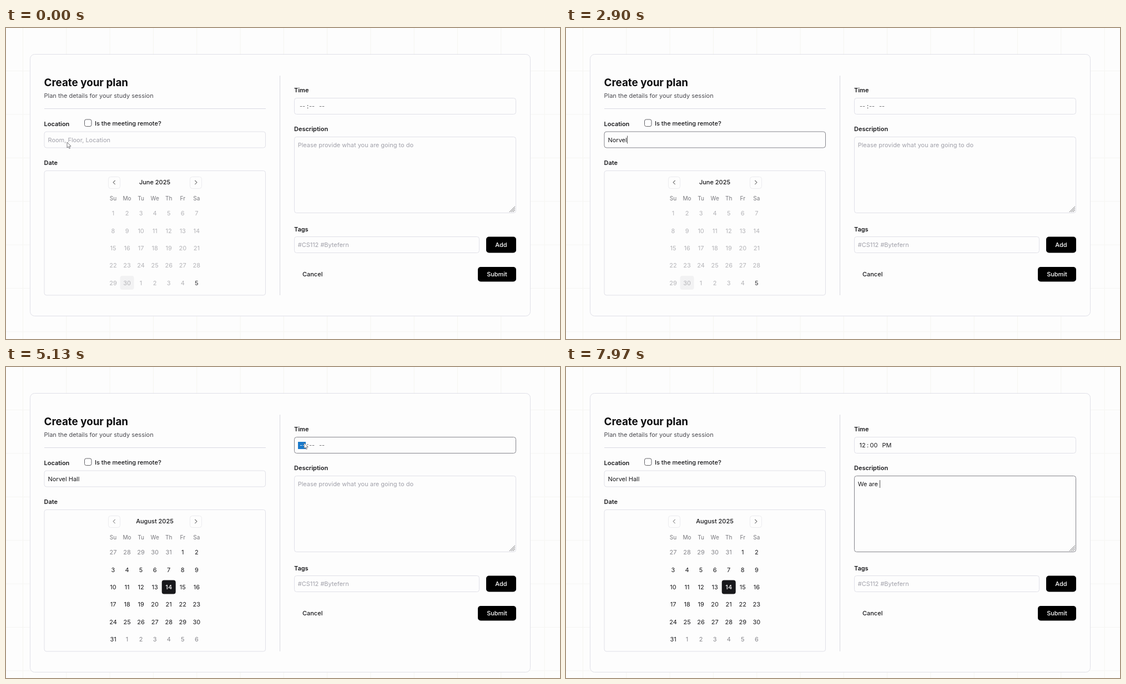
These frames come from a looping animation (998 px wide and 561 px high, 8000 ms). An HTML page with a canvas:

```html
<!DOCTYPE html>
<html lang="en">
<head>
<meta charset="utf-8">
<title>Plan form</title>
<style>
  html, body { margin: 0; width: 100%; height: 100%; overflow: hidden; background: #fdfdfd; }
  canvas { display: block; width: 998px; height: 561px; }
</style>
</head>
<body>
<canvas id="stage" width="998" height="561"></canvas>
<script>
const ctx = document.getElementById('stage').getContext('2d');
const LOOP = 8000;
const INK = '#18181b', MUTED = '#a1a1aa', LINE = '#e0e0e8', FOCUS = '#85858c', BLUE = '#1979ca';
const COL = 25.05, ROW = 31.3;

// Moments at which the form changes
const at = {
  focusPlace: 900, blurPlace: 3800, july: 3800, august: 4100, pickDay: 4700,
  focusTime: 5080, hourOne: 5300, hourTwo: 5480, minutes: 5650, half: 5830, focusNote: 6300
};
const placeKeys = [1670, 2170, 2270, 2400, 2530, 2730, 3130, 3230, 3320, 3400, 3480];
const noteKeys = [7030, 7200, 7330, 7400, 7470, 7630, 7830];

// Pointer stops: time, x, y, shape
const stops = [
  [0, 110, 206, 'arrow'], [60, 114, 206, 'beam'], [830, 151, 195, 'beam'], [1670, 151, 195, 'none'],
  [3540, 151, 195, 'beam'], [3600, 190, 225, 'arrow'], [3740, 339, 282, 'hand'],
  [4300, 339, 282, 'hand'], [4550, 292, 393, 'hand'], [4800, 292, 393, 'hand'],
  [4880, 370, 320, 'arrow'], [5060, 537, 137, 'arrow'], [6060, 537, 137, 'arrow'],
  [6130, 550, 160, 'arrow'], [6170, 580, 200, 'beam'], [6220, 593, 212, 'beam'], [7030, 593, 212, 'none']
];

function text(str, x, y, { size = 10.98, weight = 400, color = INK, align = 'left' } = {}) {
  ctx.font = `${weight} ${size}px Inter, sans-serif`;
  ctx.fillStyle = color;
  ctx.textAlign = align;
  ctx.fillText(str, x, y);
}

function box(x, y, w, h, r, { fill, stroke } = {}) {
  ctx.beginPath();
  ctx.roundRect(x, y, w, h, r);
  if (fill) { ctx.fillStyle = fill; ctx.fill(); }
  if (stroke) { ctx.strokeStyle = stroke; ctx.lineWidth = 1; ctx.stroke(); }
}

function path(points, color, width = 1, fill) {
  ctx.beginPath();
  points.forEach(([x, y]) => ctx.lineTo(x, y));
  if (fill) { ctx.closePath(); ctx.fillStyle = fill; ctx.fill(); }
  ctx.strokeStyle = color;
  ctx.lineWidth = width;
  ctx.stroke();
}

const field = (x, y, w, h, focused) => box(x, y, w, h, 4, { stroke: focused ? FOCUS : LINE });
const label = (str, x, y) => text(str, x, y, { weight: 600 });

function button(str, x, y, w, h) {
  box(x, y, w, h, 5, { fill: '#000' });
  text(str, x + w / 2, y + h / 2 + 4, { weight: 500, color: '#fff', align: 'center' });
}

function drawGrid() {
  for (let x = 30.5; x < 998; x += 78.3) path([[x, 0], [x, 561]], '#f5f5f0');
  for (let y = 77.5; y < 561; y += 78.4) path([[0, y], [998, y]], '#f5f5f3');
}

// Typed text with its blinking caret
function typed(str, keys, hint, x, y, t, focusedFrom, focusedTo) {
  const count = keys.filter(k => t >= k).length;
  const shown = str.slice(0, count);
  text(shown || hint, x, y, { color: count ? INK : MUTED });
  if (t < focusedFrom || t >= focusedTo) return;
  const last = count ? keys[count - 1] : focusedFrom;
  if ((t - last) % 1060 < 530) {
    ctx.fillStyle = '#555';
    ctx.fillRect(Math.round(x + ctx.measureText(shown).width), y - 11, 1, 14);
  }
}

function navButton(x, dir, hover, dim) {
  box(x, 268.5, 21, 21, 4, { fill: hover ? '#eeeef0' : null, stroke: '#ececef' });
  const cx = x + 10.5;
  path([[cx - 1.7 * dir, 275], [cx + 1.9 * dir, 278.6], [cx - 1.7 * dir, 282.2]],
    hover ? '#222' : dim ? '#999' : '#777', 1.1);
}

function drawCalendar(t, pointer) {
  const month = t < at.july ? 5 : t < at.august ? 6 : 7;
  const center = { align: 'center' };
  text(['June', 'July', 'August'][month - 5] + ' 2025', 268, 282, { ...center, weight: 500 });
  const hover = pointer.shape === 'hand' && pointer.y < 292;
  navButton(184.5, -1, false, month > 5);
  navButton(331.5, 1, hover);
  'Su Mo Tu We Th Fr Sa'.split(' ').forEach((d, i) =>
    text(d, 193 + i * COL, 311, { ...center, size: 10.03, color: '#77777c' }));

  const lead = new Date(2025, month, 1).getDay();
  const cells = month === 7 ? 42 : 35;
  for (let i = 0; i < cells; i++) {
    const date = new Date(2025, month, 1 - lead + i);
    const x = 193 + (i % 7) * COL;
    const y = 334.3 + Math.floor(i / 7) * ROW;
    const day = date.getDate();
    const outside = date.getMonth() !== month;
    const disabled = date < new Date(2025, 6, 5);
    const today = date.getMonth() === 5 && day === 30;
    const target = month === 7 && !outside && day === 14;
    const picked = target && t >= at.pickDay;
    const hovered = target && pointer.shape === 'hand' && Math.abs(pointer.y - y) < 13;
    if (picked || today || hovered)
      box(x - 12.5, y - 12.5, 25, 25, 4, { fill: picked ? INK : '#f2f2f3' });
    let color = outside ? '#85858a' : INK;
    if (disabled) color = '#b4b4b8';
    else if (month === 5) color = '#4a4a4e';
    if (picked) color = '#fff';
    const strong = picked || (month === 5 && !disabled);
    text(day, x, y + 4, { ...center, color, weight: strong ? 500 : 400 });
  }
}

function drawTime(t) {
  const focused = t >= at.focusTime && t < at.focusNote;
  field(519.5, 126.5, 399, 29, focused);
  const hour = t < at.hourOne ? '--' : t < at.hourTwo ? '01' : '12';
  const minute = t < at.minutes ? '--' : '00';
  const half = t < at.half ? '--' : 'PM';
  const selected = focused ? (t < at.hourTwo ? 0 : 1) : -1;
  [[hour, 534, 14], [minute, 554.5, 18]].forEach(([str, x, w], i) => {
    const on = i === selected;
    const blank = str === '--';
    if (blank && i) x = 551;
    if (on) { ctx.fillStyle = BLUE; ctx.fillRect(x - w / 2 - 1, 135, w, 13); }
    text(str, x, 145, { align: 'center', color: on ? '#fff' : blank ? '#66666a' : INK });
  });
  text(':', 543.5, 145, { align: 'center' });
  text(half, half === '--' ? 564 : 569.5, 145, { color: half === '--' ? '#66666a' : INK });
}

function pointerAt(t) {
  let i = stops.length - 1;
  while (stops[i][0] > t) i--;
  const a = stops[i], b = stops[i + 1] || a;
  const p = b === a ? 0 : (t - a[0]) / (b[0] - a[0]);
  const ease = p * p * (3 - 2 * p);
  return { x: a[1] + (b[1] - a[1]) * ease, y: a[2] + (b[2] - a[2]) * ease, shape: a[3] };
}

function drawPointer({ x, y, shape }) {
  if (shape === 'none') return;
  ctx.save();
  ctx.translate(x, y);
  ctx.lineJoin = 'round';
  if (shape === 'arrow') {
    path([[0, 0], [0, 10], [2.3, 8], [3.9, 11.4], [5.5, 10.7], [4, 7.4], [7, 7.2]], '#66666a', 0.9, '#fff');
  } else if (shape === 'beam') {
    path([[-2, -6], [0, -5.3], [2, -6]], '#77777c');
    path([[0, -5.3], [0, 5.3]], '#77777c');
    path([[-2, 6], [0, 5.3], [2, 6]], '#77777c');
  } else {
    path([[-1, 1], [0, 0], [1.2, 1], [1.2, 5], [3, 5], [4.6, 5.6], [6.2, 6.2], [6.5, 9.5],
      [5, 13.5], [0, 13.5], [-4, 8.4], [-3.2, 7.4], [-1, 9]], '#444', 0.9, '#fff');
  }
  ctx.restore();
}

function draw(t) {
  const pointer = pointerAt(t);
  const grow = t < at.august ? 0 : 31;
  ctx.fillStyle = '#fdfdfd';
  ctx.fillRect(0, 0, 998, 561);
  drawGrid();
  box(43.5, 47.5, 901, 472 + grow, 8, { fill: '#fdfdfd', stroke: LINE });
  path([[493.5, 86], [493.5, 482 + grow]], '#d9d9e0');

  text('Create your plan', 68.5, 105, { size: 18.8, weight: 700, color: '#0c0c0e' });
  text('Plan the details for your study session', 68.5, 125.5, { color: '#4a4a50' });
  path([[69, 145.5], [468, 145.5]], '#d9d9e2');

  label('Location', 68.5, 176.7);
  box(141.5, 165, 12.5, 12.5, 3, { stroke: '#65656a' });
  text('Is the meeting remote?', 160, 175.5, { weight: 500 });
  field(69, 187, 398.5, 29, t >= at.focusPlace && t < at.blurPlace);
  typed('Norvel Hall', placeKeys, 'Room, Floor, Location', 75.5, 205.5, t, at.focusPlace, at.blurPlace);

  label('Date', 68.5, 247);
  field(69, 257.5, 398.5, 224.5 + grow);
  drawCalendar(t, pointer);

  label('Time', 519, 116);
  drawTime(t);

  label('Description', 519, 186.3);
  field(519.5, 196.5, 399, 137, t >= at.focusNote);
  typed('We are ', noteKeys, 'Please provide what you are going to do', 525.7, 215, t, at.focusNote, LOOP);
  for (const d of [10, 7, 4]) path([[917 - d, 332], [917, 332 - d]], '#66666a', 0.9);

  label('Tags', 519, 366.5);
  field(519.5, 376.5, 333, 29);
  text('#CS112 #Bytefern', 525.7, 395.3, { color: MUTED });
  button('Add', 865, 376.5, 54, 29);
  text('Cancel', 534, 448.3, { weight: 500 });
  button('Submit', 850, 431, 69, 26.5);

  drawPointer(pointer);
}

function frame(now) {
  draw(now % LOOP);
  requestAnimationFrame(frame);
}
requestAnimationFrame(frame);
</script>
</body>
</html>
```
